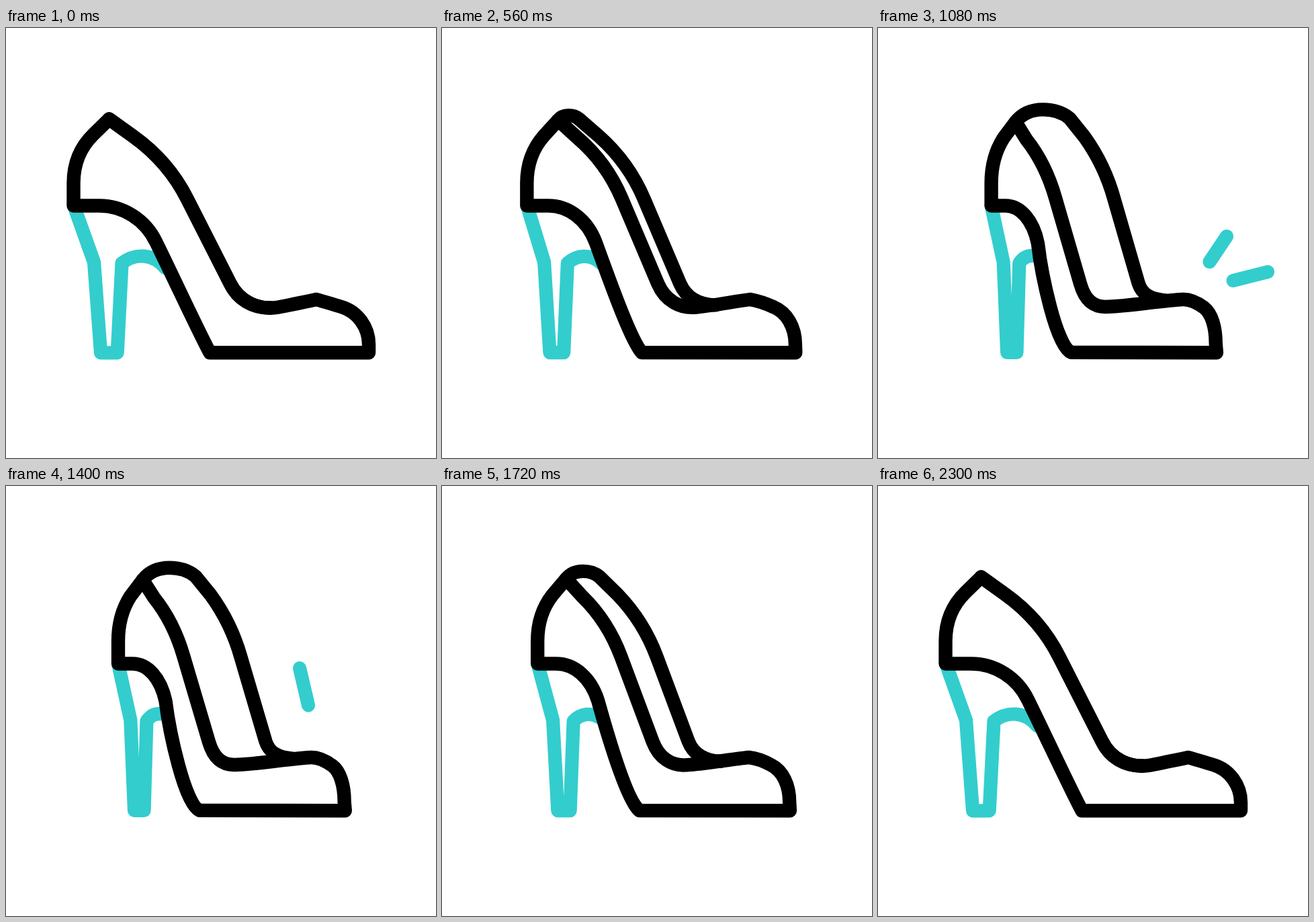
Recreate the animation shown at these times as an HTML page with a canvas. Size 640 by 640 pixels, loop 2400 ms.

```html
<!DOCTYPE html>
<html lang="en">
<head>
<meta charset="utf-8">
<title>High heel</title>
<style>
html, body { margin: 0; width: 100%; height: 100%; overflow: hidden; background: #fff; }
canvas { display: block; width: 100vmin; height: 100vmin; }
</style>
</head>
<body>
<canvas id="stage" width="640" height="640"></canvas>
<script>
const ctx = document.getElementById('stage').getContext('2d');
const LOOP = 2400;
const BLACK = '#000';
const TEAL = '#33cdcd';

// Each part has a side-on pose and a turned pose with the same commands.
const heel = [
  'M101 264.5 L131 348.5 L141 483.3 L165.7 483.3 L172.5 350 C192 335 219 335 237 357',
  'M169 264.5 L187 348.5 L192.5 483 L206.7 483 L210.5 350 C217 340 226 337 238 340'
];
const side = [
  'M153.5 135.5 L130 158.5 C110 178 100.5 203 100.5 231 L100.5 264.5 L139 264.5 ' +
  'C174 264.5 207 285 223 318 C250 373 290 459 303.5 483.3 L540 483.3 L540 471 ' +
  'C540 445 523 422 499 415 C487 411.3 474 407.6 462 404 C443 408 424 412 406 415.5 ' +
  'C376 421 347 407 333.5 380 L270 255 C251 217 224 186 189 161 Z',
  'M205 140 L187 164 C175 183 169 206 169 231 L169 264.5 L190 264.5 ' +
  'C212 264.5 231 286 238 320.5 C243 365 265 474 287.5 482.8 L503.7 483.3 L502.5 470 ' +
  'C502.5 445 496.5 425 485 416 C474 408 464 403.5 453.5 404 C425 405 370 415 338 415 ' +
  'C318 415 307 402 301 381 L264 253 C254 218 240 190 221 166 Z'
];
const rim = [
  'M153.5 135.5 C153.5 135.5 153.5 135.5 153.5 135.5 C153.5 135.5 153.5 135.5 153.5 135.5 ' +
  'L189 161 C224 186 251 217 270 255 L333.5 380 C345 404 367 417 394 416.5',
  'M205 140 C215 127 230 121.3 246 121.3 C262 121.3 276 126 286 134.5 ' +
  'L308 162 C328 190 343 222 352 255 L388 380 C393 396 405 404 429 405.5'
];

const sparks = [
  { path: 'M519 310 L493.5 348', on: 920, off: 1240 },
  { path: 'M580 363 L528.5 376', on: 920, off: 1240 },
  { path: 'M437 271 L450 326.5', on: 1240, off: 1560 }
];

// Symmetric cubic-bezier(a, 0, 1 - a, 1), solved by bisection.
function ease(x) {
  if (x <= 0) return 0;
  if (x >= 1) return 1;
  const a = 0.765;
  let lo = 0, hi = 1;
  for (let i = 0; i < 30; i++) {
    const s = (lo + hi) / 2, r = 1 - s;
    if (3 * a * s * r * r + 3 * (1 - a) * s * s * r + s ** 3 < x) lo = s;
    else hi = s;
  }
  return lo * lo * (3 - 2 * lo);
}

function turnAt(t) {
  return Math.min(ease(t / 1195), 1 - ease((t - 1172) / 1160));
}

function blend([from, to], p) {
  const ends = to.match(/[\d.]+/g);
  let i = 0;
  return from.replace(/[\d.]+/g, n => (+n + (ends[i++] - n) * p).toFixed(3));
}

function stroke(path, color, width) {
  ctx.strokeStyle = color;
  ctx.lineWidth = width;
  ctx.stroke(new Path2D(path));
}

function draw(t) {
  const p = turnAt(t);
  ctx.fillStyle = '#fff';
  ctx.fillRect(0, 0, 640, 640);
  ctx.lineCap = ctx.lineJoin = 'round';
  stroke(blend(heel, p), TEAL, 20.2);
  stroke(blend(rim, p), BLACK, 20.4);
  stroke(blend(side, p), BLACK, 20.4);
  for (const s of sparks) {
    if (t >= s.on && t < s.off) stroke(s.path, TEAL, 20.2);
  }
}

const start = performance.now();
function tick() {
  draw((performance.now() - start) % LOOP);
  requestAnimationFrame(tick);
}
tick();
</script>
</body>
</html>
```
